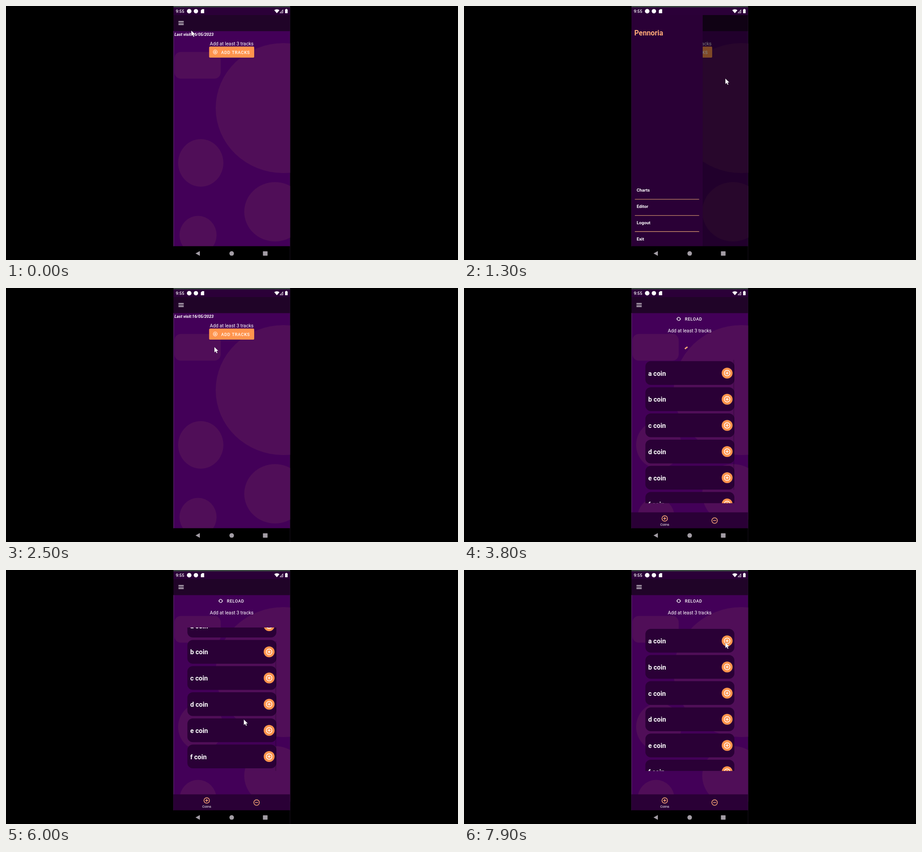
Write an HTML page with a canvas that moves like this. It is 998x561 px and loops after 8000 ms.

```html
<!DOCTYPE html>
<html lang="en">
<head>
<meta charset="utf-8">
<title>Coin tracker</title>
<style>
html, body { margin: 0; width: 100%; height: 100%; overflow: hidden; background: #000; }
canvas { display: block; }
</style>
</head>
<body>
<canvas id="stage" width="998" height="561"></canvas>
<script>
const c = document.getElementById('stage').getContext('2d');
const LOOP = 8000, TAU = Math.PI * 2;
const ORANGE = '#ff944d', PEACH = '#ffab78', PANEL = '#2a0036';

// [time, x, y] of the pointer tip
const POINTER_A = [[0, 409, 54], [300, 383, 35], [850, 383, 35], [1250, 577, 160],
  [1950, 577, 160], [2400, 460, 130], [2600, 460, 130], [3000, 492, 102], [3700, 492, 102]];
const POINTER_B = [[5150, 556, 69], [5400, 540, 323], [5650, 540, 360], [6000, 525, 330],
  [6600, 525, 330], [6900, 527, 420], [7100, 527, 420], [7700, 577, 160], [8000, 577, 160]];

const clamp = v => Math.max(0, Math.min(1, v));
const smooth = v => (v = clamp(v), v * v * (3 - 2 * v));
const ramp = (t, from, to) => smooth((t - from) / (to - from));

function along(keys, t) {
  const i = keys.findIndex(k => k[0] > t);
  const a = keys[i - 1], b = keys[i], p = ramp(t, a[0], b[0]);
  return [a[1] + (b[1] - a[1]) * p, a[2] + (b[2] - a[2]) * p];
}

function box(x, y, w, h, color, r = 0) {
  c.fillStyle = color;
  c.beginPath();
  c.roundRect(x, y, w, h, r);
  c.fill();
}

function oval(x, y, rx, ry, color) {
  c.fillStyle = color;
  c.beginPath();
  c.ellipse(x, y, rx, ry, 0, 0, TAU);
  c.fill();
}

function shape(points, color) {
  c.fillStyle = color;
  c.beginPath();
  points.forEach(p => c.lineTo(...p));
  c.closePath();
  c.fill();
}

function text(str, x, y, font, color = '#fff', align = 'left', spacing = 0) {
  c.font = font + ' Roboto, sans-serif';
  c.letterSpacing = spacing + 'px';
  c.textAlign = align;
  c.fillStyle = color;
  c.fillText(str, x, y);
}

function arc(x, y, r, from, to, color, width) {
  c.strokeStyle = color;
  c.lineWidth = width;
  c.beginPath();
  c.arc(x, y, r, from, to);
  c.stroke();
}

function signIcon(x, y, r, color, width, plus = true) {
  arc(x, y, r, 0, TAU, color, width);
  const a = r * 0.55;
  c.beginPath();
  c.moveTo(x - a, y);
  c.lineTo(x + a, y);
  if (plus) {
    c.moveTo(x, y - a);
    c.lineTo(x, y + a);
  }
  c.stroke();
}

function clipped(x, y, w, h, draw) {
  c.save();
  c.beginPath();
  c.rect(x, y, w, h);
  c.clip();
  draw();
  c.restore();
}

function backdrop() {
  const tint = '#500e58';
  box(369.5, 55, 258, 476, '#430058');
  oval(612, 225.5, 149, 143.5, tint);
  oval(430, 346.5, 50, 52.5, tint);
  oval(594, 454.5, 68, 65.5, tint);
  oval(424, 506, 41, 42.5, tint);
  box(372, 101.5, 102, 59, tint, 14);
  box(369.5, 55, 1, 476, '#70407f');
}

function header() {
  box(369.5, 19, 258, 36.5, '#200428');
  for (const y of [33.5, 36.9, 40.3]) box(380.8, y, 11.6, 1.4, '#fff');
}

function statusBar() {
  box(369.5, 0, 258, 3, '#39443f');
  box(369.5, 3, 258, 17, '#2b0038');
  text('9:55', 375, 15, '500 9.4px');
  oval(404.5, 11.5, 5, 5, '#fff');
  oval(419.3, 11.5, 4.8, 4.8, '#fff');
  shape([[433, 7], [437.5, 7], [437.5, 16], [430.2, 16], [430.2, 9.8]], '#fff');
  c.beginPath();
  c.moveTo(598, 16);
  c.arc(598, 16, 8.8, -2.28, -0.86);
  c.fill();
  shape([[604, 15.8], [612, 15.8], [612, 7.3]], '#cfc4d3');
  shape([[606.5, 14.6], [610.8, 14.6], [610.8, 10.2]], '#4c2857');
  box(616.2, 7.5, 5.6, 8.5, '#fff', 0.8);
  box(617.7, 6.5, 2.6, 1.5, '#fff');
}

function navBar() {
  box(369.5, 530.5, 258, 30.5, '#000');
  shape([[418.5, 546.5], [428, 541.3], [428, 551.8]], '#a39da5');
  oval(498.3, 546.6, 5, 5, '#a39da5');
  box(567.3, 541.8, 10.2, 9.8, '#a39da5', 0.8);
}

function home() {
  text('Last visit:16/05/2023', 372, 66, 'italic 700 9.2px');
  text('Add at least 3 tracks', 498.3, 86.8, '400 10.6px', '#fff', 'center');
  box(448.5, 89.5, 99.5, 24.5, ORANGE, 2.6);
  signIcon(462, 101.6, 4.3, '#fff', 1.1);
  text('ADD TRACKS', 475, 105.6, '500 9.4px', '#fff', 'left', 0.75);
}

function drawer(open) {
  box(369.5, 19, 258, 512, `rgba(0,0,0,${0.5 * open})`);
  clipped(369.5, 19, 258, 512, () => {
    c.translate(-158 * (1 - open), 0);
    box(369.5, 19, 157.5, 512, PANEL);
    text('Pennoria', 376, 65.2, '700 15.8px', PEACH);
    ['Charts', 'Editor', 'Logout', 'Exit'].forEach((label, i) => {
      const y = 407 + i * 35.7;
      text(label, 381.2, y + 3.4, '700 9.7px');
      if (i < 3) box(377, y + 19.2, 142.5, 1.4, '#c58a68', [1.4, 1.4, 0, 0]);
    });
  });
}

function reloadIcon(x, y) {
  arc(x, y, 3.6, -2.9, -0.2, '#fff', 1.2);
  arc(x, y, 3.6, 0.25, 2.95, '#fff', 1.2);
  shape([[x + 1.7, y - 0.6], [x + 5.3, y - 0.6], [x + 3.5, y + 1.6]], '#fff');
  shape([[x - 5.3, y + 0.6], [x - 1.7, y + 0.6], [x - 3.5, y - 1.6]], '#fff');
}

function spinner(t) {
  const u = (((t - 3800) / 1333) % 1 + 1) % 1;
  const base = -2.5 + (t - 3800) / 2222 * TAU;
  const start = base + 4.7 * ramp(u, 0.5, 1);
  arc(498.3, 142.5, 13, start, base + 0.55 + 4.7 * ramp(u, 0, 0.5), PEACH, 3);
}

function coinList(t) {
  const loading = t < 4600;
  const top = loading ? 158.5 : 127;
  const scroll = 33.4 * (ramp(t, 5650, 6000) - ramp(t, 6620, 6900));
  if (loading) spinner(t);
  clipped(398, top, 201, 316.8, () => {
    [...'abcdef'].forEach((letter, i) => {
      const y = top + 3 + i * 57.8 - scroll;
      box(400.5, y, 196.5, 52.5, PANEL, 12);
      text(letter + ' coin', 406.7, y + 32, '700 14.5px');
      oval(581, y + 26.4, 12, 12, ORANGE);
      signIcon(581, y + 26.4, 6.2, '#fff', 1.5);
    });
    const fade = 0.22 * (1 - ramp(t, 7300, 7900));
    box(594.3, top + scroll * 0.9, 2.7, 287, `rgba(20,0,30,${fade})`);
  });
}

function coins(t) {
  reloadIcon(474, 68.3);
  text('RELOAD', 487.7, 72, '500 9.3px', '#fff', 'left', 0.66);
  text('Add at least 3 tracks', 498.3, 98.2, '400 10.6px', '#fff', 'center');
  coinList(t);
  box(369.5, 495.5, 258, 35, PANEL);
  signIcon(443.2, 509, 6.1, PEACH, 1.5);
  text('Coins', 443.2, 524.8, '400 7.9px', '#fff', 'center');
  signIcon(553.3, 513.6, 6.1, PEACH, 1.5, false);
}

function pointer(x, y) {
  const arrow = [[0, 0], [0, 12.6], [2.9, 9.9], [4.9, 14.2], [7, 13.2], [5.1, 9.1], [9, 9.1]]
    .map(p => [x + p[0], y + p[1]]);
  shape(arrow, '#fff');
  c.strokeStyle = 'rgba(20,0,30,.55)';
  c.lineWidth = 0.6;
  c.stroke();
}

function render(t) {
  box(0, 0, 998, 561, '#000');
  clipped(369.5, 0, 258, 561, () => {
    backdrop();
    header();
    if (t < 3700) home();
    else coins(t);
    const open = ramp(t, 970, 1230) - ramp(t, 1900, 2150);
    if (open > 0) drawer(open);
    statusBar();
    navBar();
    box(626.8, 3, 0.8, 558, '#35203d');
    if (t < 3700) pointer(...along(POINTER_A, t));
    else if (t >= 5150) pointer(...along(POINTER_B, t));
  });
}

const begin = performance.now();
function tick() {
  render((performance.now() - begin) % LOOP);
  requestAnimationFrame(tick);
}
tick();
</script>
</body>
</html>
```
